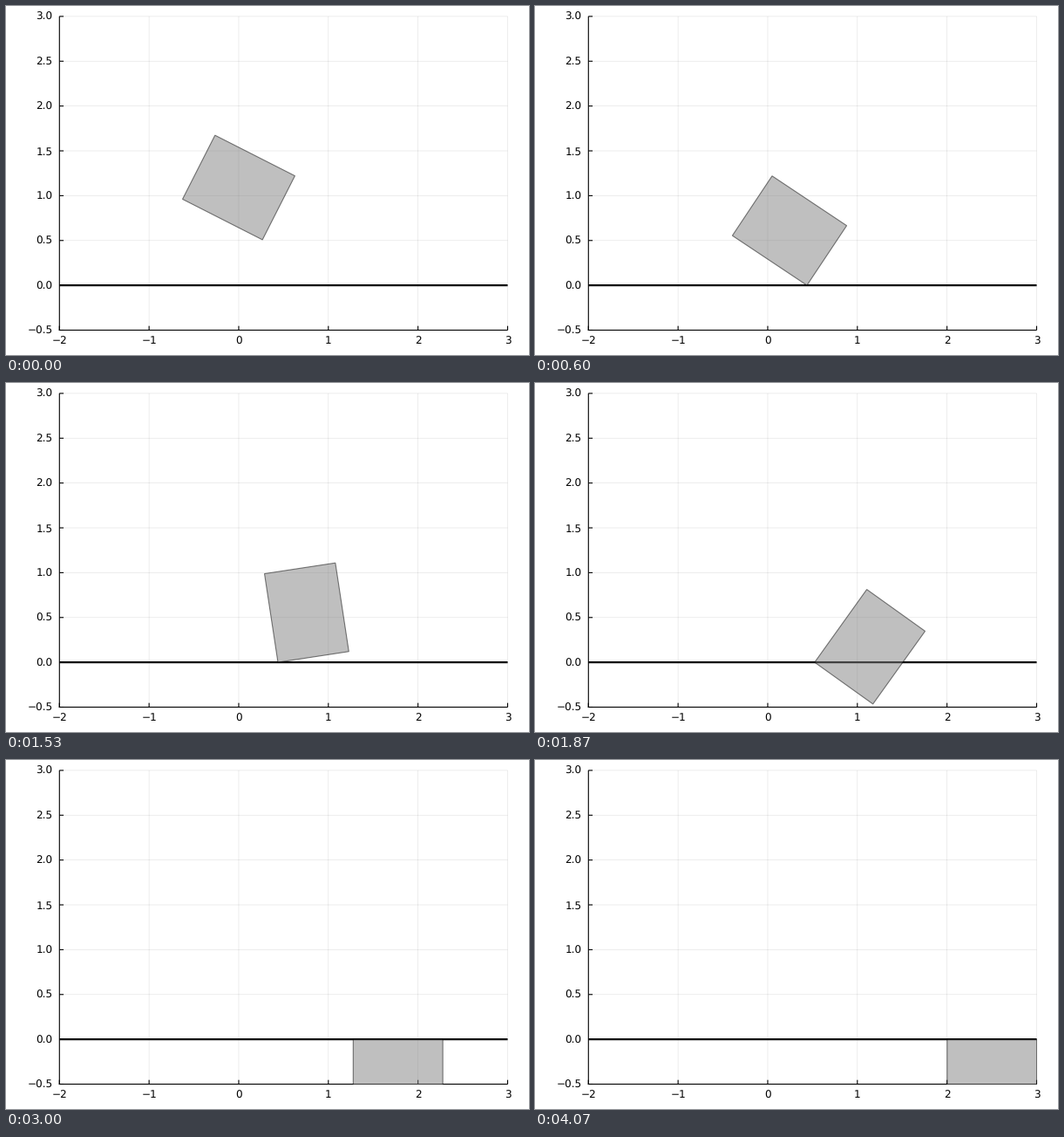
Write a matplotlib script that moves like this. It is 600x400 px and loops after 4140 ms.

```python
import numpy as np
import matplotlib.pyplot as plt
from matplotlib.animation import FuncAnimation
from matplotlib.patches import Polygon, Rectangle

plt.rcParams["font.family"] = "DejaVu Sans"
plt.rcParams["text.hinting"] = "none"

W, H, DPI = 600, 400, 100
LEFT, RIGHT, TOP, BOTTOM = 61.3, 575.5, 11.9, 371.5
LOOP, TICK, STEP = 4140, 20, 200 / 3   # ms
LAST = 61                              # last simulation step
DT = 0.05                              # simulated seconds per step

BOX = np.array([(-0.5, -0.4), (0.5, -0.4), (0.5, 0.4), (-0.5, 0.4)])
PIVOT = 0.4375
IMPACT, SLIP = -0.554, -1.42           # tilt at first contact and at slipping


def px(x):
    return LEFT + (np.asarray(x) + 2) * (RIGHT - LEFT) / 5


def py(y):
    return BOTTOM - (np.asarray(y) + 0.5) * (BOTTOM - TOP) / 3.5


def lw(pixels):
    return pixels * 72 / DPI


def corner_offset(a):
    """Centre of the box relative to its touching corner."""
    c, s = np.cos(a), np.sin(a)
    return -0.5 * c - 0.4 * s, 0.4 * c - 0.5 * s


def fall(n):
    t = min(n * DT, 0.32)
    return 0.696 * t, 1.091 + 0.046 * t - 4.905 * t * t, -0.47 - 0.2625 * t


def tip(n):
    """Inverted pendulum about the fixed corner, with a short rest."""
    t = 0.02 + DT * (min(n, 19) - 9 + max(0, n - 21))
    t = np.clip(t, 0, 0.576)
    k, balance = 3.39, -0.896
    a = balance + (IMPACT - balance) * np.cosh(k * t) - 1.722 / k * np.sinh(k * t)
    a = max(a, SLIP)
    dx, dy = corner_offset(a)
    return PIVOT + dx, dy, a


def topple(n):
    """The corner slips along the ground while the box turns over."""
    t = min((n - 24) * DT, 0.366)
    a = SLIP - 2.2 * t - 10.06 * t**2 + 8.8 * t**3
    if n >= 32:
        a = -np.pi
    x = PIVOT + corner_offset(SLIP)[0] + 1.8 * t + 0.54 * t * t
    return x, corner_offset(a)[1], a


def slide(n):
    x, y, a = topple(32)
    m = min(n - 35, 25.65)
    return x + 0.0476 * (m - 4.4 * (1 - np.exp(-m / 4.4))), y, a


def pose(n):
    if n < 7:
        return fall(n)
    if n <= 24:
        return tip(n)
    if n <= 35:
        return topple(n)
    return slide(n)


def corners(n):
    x, y, a = pose(n)
    c, s = np.cos(a), np.sin(a)
    pts = BOX @ np.array([(c, s), (-s, c)])
    return np.column_stack([px(pts[:, 0] + x), py(pts[:, 1] + y)])


fig = plt.figure(figsize=(W / DPI, H / DPI), dpi=DPI, facecolor="white")
ax = fig.add_axes([0, 0, 1, 1])
ax.set_xlim(0, W)
ax.set_ylim(H, 0)
ax.axis("off")


def line(xs, ys, width, **kw):
    ax.plot(xs, ys, color="black", lw=lw(width), snap=False,
            solid_capstyle="butt", **kw)


def label(x, y, text, ha):
    ax.text(x, y + 4.4, text.replace("-", "\u2212"), ha=ha, va="baseline",
            fontsize=lw(12), color="black")


for v in range(-2, 4):
    x = px(v)
    line([x, x], [TOP, BOTTOM], 0.7, alpha=0.1, zorder=1)
    line([x, x], [BOTTOM, BOTTOM - 4.8], 1.1, zorder=2)
    label(x, 383, str(v), "center")

for v in np.arange(-0.5, 3.1, 0.5):
    y = py(v)
    line([LEFT, RIGHT], [y, y], 0.7, alpha=0.1, zorder=1)
    line([LEFT, LEFT + 4.8], [y, y], 1.1, zorder=2)
    label(53.5, y, f"{v:.1f}", "right")

line([LEFT, LEFT], [TOP, BOTTOM + 0.5], 1.1, zorder=2)
line([LEFT - 0.5, RIGHT], [BOTTOM, BOTTOM], 1.1, zorder=2)
line([LEFT, RIGHT], [py(0), py(0)], 2.2, zorder=3)

box = Polygon(corners(0), closed=True, facecolor=(0.5, 0.5, 0.5, 0.5),
              edgecolor=(0, 0, 0, 0.5), lw=lw(1.1), snap=False, zorder=4)
ax.add_patch(box)
box.set_clip_path(Rectangle((LEFT, TOP), RIGHT - LEFT, BOTTOM - TOP + 0.4,
                            transform=ax.transData))


def update(i):
    t = i * TICK + TICK / 2
    n = min(int((t + 5) // STEP), LAST)
    box.set_xy(corners(n))
    return (box,)


anim = FuncAnimation(fig, update, frames=LOOP // TICK, interval=TICK,
                     repeat=True, blit=False)
plt.show()
```
